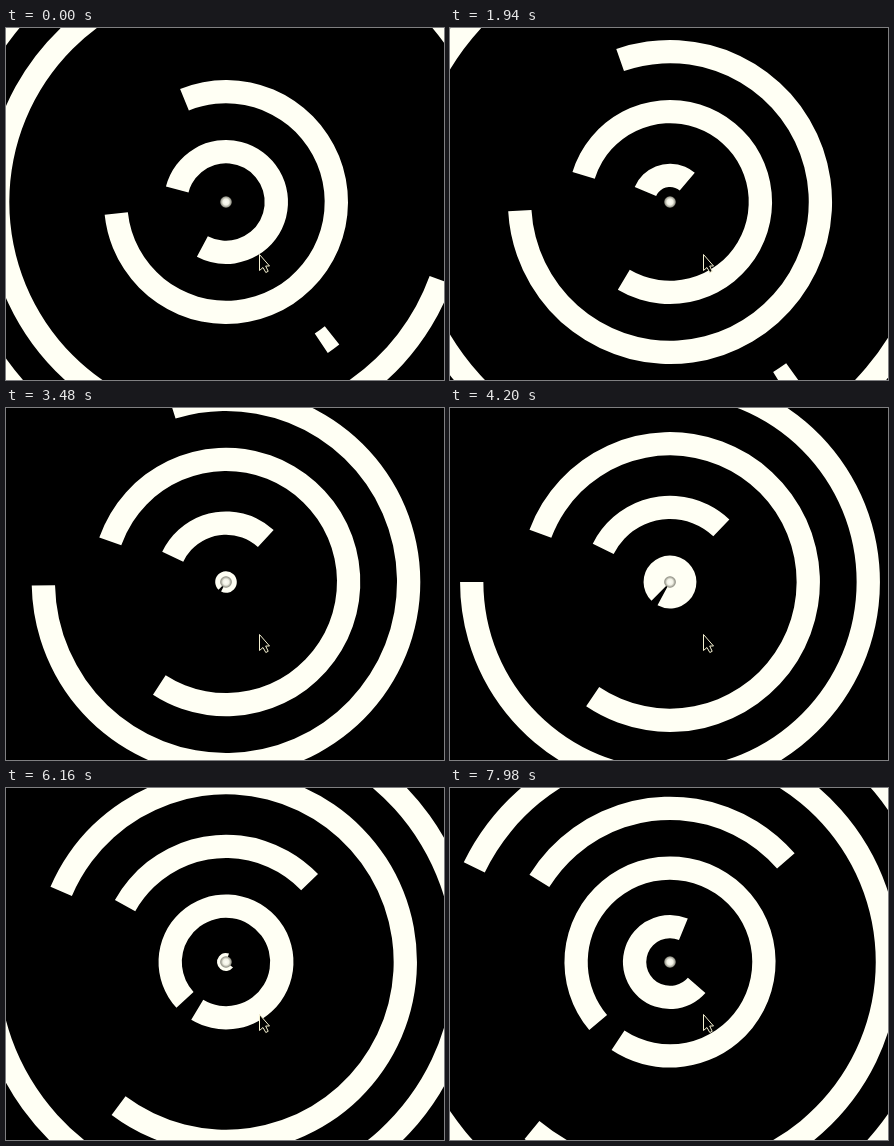
These frames come from a looping animation (438 by 352 pixels, 8 s). An HTML page with a canvas:

```html
<!DOCTYPE html>
<html lang="en">
<head>
<meta charset="utf-8">
<title>Expanding rings</title>
<style>
  html, body { margin: 0; width: 100%; height: 100%; overflow: hidden; background: #000; }
  canvas { display: block; }
</style>
</head>
<body>
<canvas id="stage" width="438" height="352"></canvas>
<script>
const ctx = document.getElementById('stage').getContext('2d');
const WIDTH = 438, HEIGHT = 352, CX = 220, CY = 174;
const LOOP = 8000, BAND = 23.3;
const GROWTH = 0.977;  // px per step
const TURN = 0.0667;   // degrees per step
const IVORY = '#fffff4';

// Outer radius, start and end angle (clockwise degrees) at step 0.
const rings = [
  [293.3, 75, 375],
  [240, 20, 270],
  [182, 51.5, 56],
  [122, 247.9, 534],
  [62, 194.4, 478],
  [-1.7, 200.4, 307.5],
  [-61.5, 128.5, 472.2],
  [-120, 29.8, 280.8]
];

const cursor = new Path2D(
  'M253.5 226.5V242.5L257 239.5L259.8 244.5L262.2 243.3L259.7 238H263.5Z');

// Steps come in threes every 140 ms: one long hold, then two short ones.
function stepAt(time) {
  const phase = time % 140;
  return 3 * Math.floor(time / 140) + (phase >= 20) + (phase >= 120);
}

function drawRing([radius, from, to], step) {
  const outer = radius + GROWTH * step;
  if (outer <= 0) return;
  const inner = Math.max(0, outer - BAND);
  const angle = degrees => (degrees + TURN * step) * Math.PI / 180;
  ctx.beginPath();
  ctx.arc(CX, CY, outer, angle(from), angle(to));
  ctx.arc(CX, CY, inner, angle(to), angle(from), true);
  ctx.closePath();
  ctx.fillStyle = IVORY;
  ctx.fill();
}

function drawDot() {
  const shade = ctx.createRadialGradient(CX, CY, 0, CX, CY, 6);
  shade.addColorStop(0, '#fffff8');
  shade.addColorStop(0.5, '#f0f0e4');
  shade.addColorStop(1, '#77776c');
  ctx.beginPath();
  ctx.arc(CX, CY, 5.8, 0, 2 * Math.PI);
  ctx.fillStyle = shade;
  ctx.fill();
}

function drawCursor() {
  ctx.fillStyle = '#000';
  ctx.fill(cursor);
  ctx.strokeStyle = '#f4f0d0';
  ctx.lineWidth = 1;
  ctx.stroke(cursor);
}

function draw() {
  const step = stepAt(performance.now() % LOOP);
  ctx.fillStyle = '#000';
  ctx.fillRect(0, 0, WIDTH, HEIGHT);
  rings.forEach(ring => drawRing(ring, step));
  drawDot();
  drawCursor();
  requestAnimationFrame(draw);
}
draw();
</script>
</body>
</html>
```
